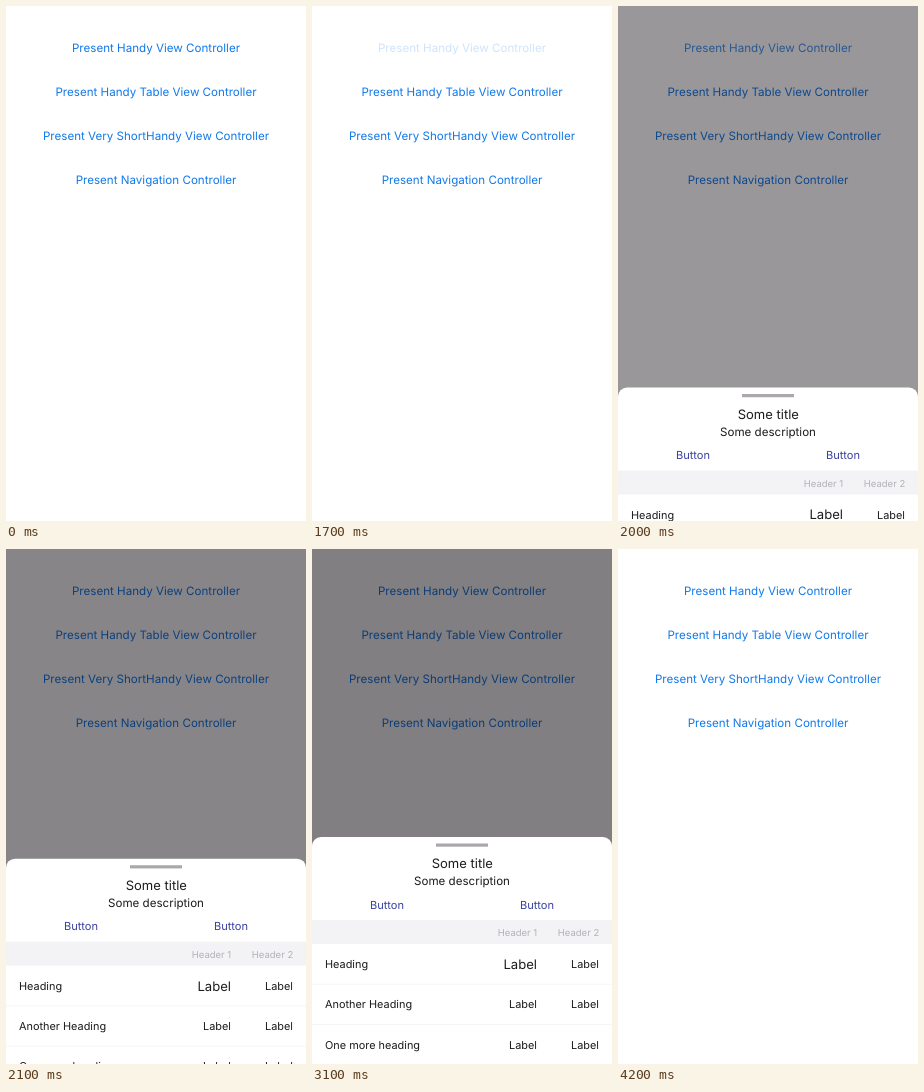
These frames come from a looping animation (300x515 px, 4.6 s). An HTML page:

```html
<!DOCTYPE html>
<html lang="en">
<head>
<meta charset="utf-8">
<title>Bottom sheet</title>
<style>
  html, body { margin: 0; width: 100%; height: 100%; overflow: hidden; background: #fff; }
  svg { display: block; width: 100%; height: 100%; }
  text { font-family: Inter, Roboto, sans-serif; font-size: 10.9px; fill: #1c1c1e; text-rendering: geometricPrecision; }
  .link { font-size: 11.6px; fill: #1279ea; }
  .title { font-size: 13px; }
  .body { font-size: 11.6px; }
  .button { font-size: 11.1px; fill: #3b419f; }
  .header { font-size: 9.5px; fill: #b4b2b7; }
  .large { font-size: 13.1px; }
</style>
</head>
<body>
<svg viewBox="0 0 300 515">
  <rect width="300" height="515" fill="#fff"/>
  <g id="links"></g>
  <rect id="shade" width="300" height="515" fill="#050005"/>
  <g id="sheet">
    <rect width="300" height="560" rx="9" fill="#fff"/>
    <rect x="124" y="6.5" width="52" height="3.2" fill="#aaa8ab"/>
    <rect y="83" width="300" height="24" fill="#f3f2f5"/>
  </g>
</svg>
<script>
const LOOP = 4600, STEP = 100;
const SHEET_TOP = 288, TRAVEL = 515, SHADE = 0.5;
const SPRING_RATE = 18.26; // per second

const $ = id => document.getElementById(id);
const links = $('links'), shade = $('shade'), sheet = $('sheet');

function add(parent, tag, attrs, label = '') {
  const node = document.createElementNS('http://www.w3.org/2000/svg', tag);
  for (const key in attrs) node.setAttribute(key, attrs[key]);
  node.textContent = label;
  parent.append(node);
  return node;
}

const write = (parent, label, x, y, anchor, style = '') =>
  add(parent, 'text', { x, y, 'text-anchor': anchor, class: style }, label);

const [tapped] = ['Handy View', 'Handy Table View', 'Very ShortHandy View', 'Navigation'].map((kind, i) =>
  write(links, `Present ${kind} Controller`, 150, 45.6 + 44 * i, 'middle', 'link'));

write(sheet, 'Some title', 150.3, 31, 'middle', 'title');
write(sheet, 'Some description', 150, 48, 'middle', 'body');
for (const x of [75, 225]) write(sheet, 'Button', x, 71.7, 'middle', 'button');
write(sheet, 'Header 1', 225.2, 99.2, 'end', 'header');
write(sheet, 'Header 2', 287.2, 99.2, 'end', 'header');

['Heading', 'Another Heading', 'One more heading'].forEach((name, i) => {
  const y = 131.2 + 40.2 * i;
  write(sheet, name, 13, y, 'start');
  write(sheet, 'Label', 225, i ? y : y + .6, 'end', i ? '' : 'large');
  write(sheet, 'Label', 287, y, 'end');
  add(sheet, 'rect', { y: y + 15.6, width: 300, height: .8, fill: '#f3f2f5' });
});

// Critically damped spring from 0 to 1
function spring(t, start) {
  const x = Math.max(0, t - start) / 1000 * SPRING_RATE;
  return 1 - (1 + x) * Math.exp(-x);
}

function tapOpacity(t) {
  if (t < 1700) return 1;
  return Math.min(1, Math.max(.2, .4 + (t - 1900) / 250));
}

function render(t) {
  const closing = t >= 3600;
  const shown = closing ? 1 - spring(t, 3567) : spring(t, 1829);
  const dim = closing ? 1 - spring(t, 3480) : shown;
  shade.setAttribute('opacity', SHADE * dim);
  tapped.setAttribute('opacity', tapOpacity(t));
  sheet.setAttribute('transform', `translate(0 ${SHEET_TOP + TRAVEL * (1 - shown)})`);
}

const origin = performance.now();
function tick() {
  const t = (performance.now() - origin) % LOOP;
  render(Math.floor(t / STEP) * STEP);
  requestAnimationFrame(tick);
}
tick();
</script>
</body>
</html>
```
